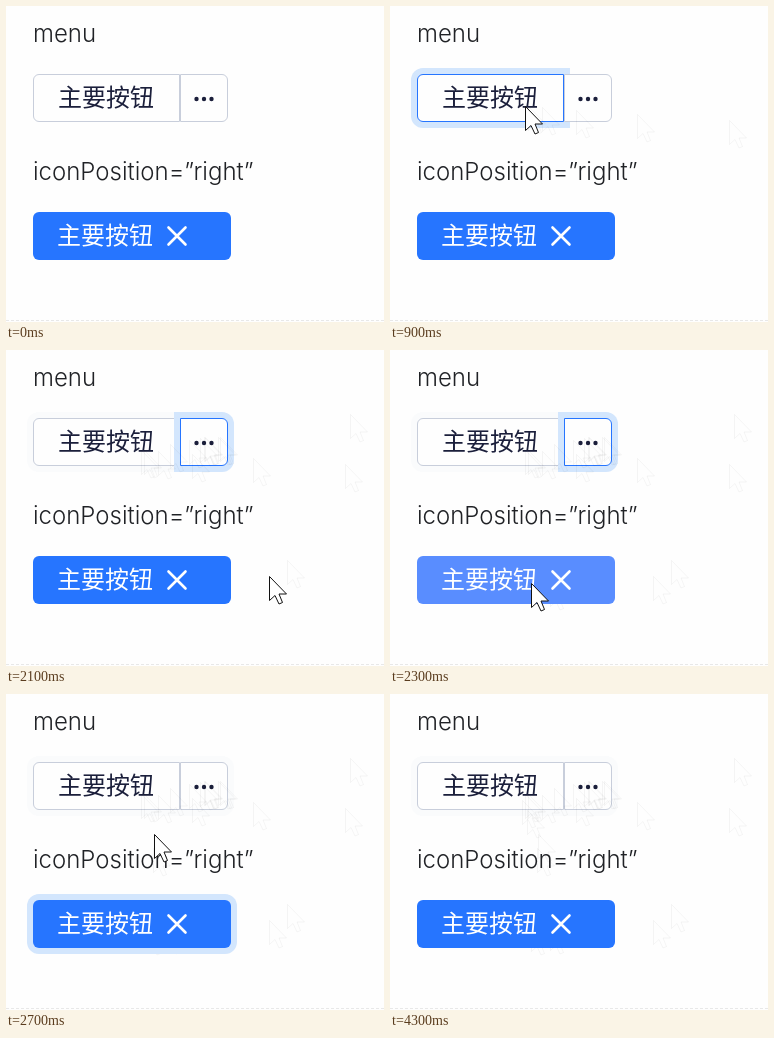
These frames come from a looping animation (378x316 px, 5500 ms). An HTML page:

```html
<!DOCTYPE html>
<html lang="zh">
<head>
<meta charset="utf-8">
<title>Button states</title>
<style>
  html, body { margin: 0; width: 100%; height: 100%; overflow: hidden; background: #fefefe; }
  svg { display: block; width: 378px; height: 316px; }
  .label { font: 300 24px Inter, "Open Sans", sans-serif; fill: #202226; }
  .cjk { font: 300 24px "Noto Sans CJK SC", "Noto Sans CJK", sans-serif; }
  .strong { font-weight: 500; }
</style>
</head>
<body>
<svg id="stage" viewBox="0 0 378 316"></svg>
<script>
const LOOP = 5500, STEP = 100, ENTER = 200, LEAVE = 3500, LAST_TRACE = 3000;
const BLUE = '#2675ff', INK = '#1b1f3b', GREY = '#c8cedb', HALO = '#d3e6fd', FADED = '#fafbfc';
const stage = document.getElementById('stage');

const main = { x: 27, y: 68, w: 147, h: 48, left: 6, right: 0 };
const more = { x: 174, y: 68, w: 48, h: 48, left: 0, right: 6 };
const solid = { x: 27, y: 206, w: 198, h: 48, left: 6, right: 6 };

// The pointer enters here and then makes a few eased moves.
const entry = { x: 340, y: 114 };
const moves = [
  { from: 200, to: 700, x: 136, y: 100 },
  { from: 900, to: 1400, x: 200, y: 87 },
  { from: 1500, to: 1700, x: 215, y: 87 },
  { from: 1800, to: 1900, x: 345, y: 64 },
  { from: 1900, to: 2000, x: 282, y: 210 },
  { from: 2000, to: 2100, x: 264, y: 226 },
  { from: 2100, to: 2300, x: 142, y: 233 },
  { from: 2500, to: 2700, x: 149, y: 140 },
  { from: 2700, to: 3000, x: 132, y: 104 },
  { from: 3000, to: 3400, x: 360, y: 49 }
];

const between = (t, from, to) => t >= from && t < to;
const easeOut = k => 1 - (1 - k) ** 2.7;
const inside = (p, b) => p && between(p.x, b.x, b.x + b.w) && between(p.y, b.y, b.y + b.h);

function pointerAt(t) {
  return moves.reduce((p, m) => {
    const k = easeOut(Math.min(1, Math.max(0, (t - m.from) / (m.to - m.from))));
    return { x: p.x + (m.x - p.x) * k, y: p.y + (m.y - p.y) * k };
  }, entry);
}

// Rounded box grown by d, with separate radii for its left and right corners.
function box(b, d, fill, stroke = 'none') {
  const l = b.left && b.left + d, r = b.right && b.right + d;
  const w = b.w + 2 * d, h = b.h + 2 * d;
  const path = `M${b.x - d + l} ${b.y - d}h${w - l - r}a${r} ${r} 0 0 1 ${r} ${r}v${h - 2 * r}` +
    `a${r} ${r} 0 0 1 ${-r} ${r}h${l + r - w}a${l} ${l} 0 0 1 ${-l} ${-l}v${2 * l - h}a${l} ${l} 0 0 1 ${l} ${-l}z`;
  return `<path d="${path}" fill="${fill}" stroke="${stroke}"/>`;
}

const text = (x, y, kind, words, fill) =>
  `<text x="${x}" y="${y}" class="${kind}"${fill ? ` fill="${fill}"` : ''}>${words}</text>`;

const arrow = (p, paint) =>
  `<path transform="translate(${Math.round(p.x) - .5} ${Math.round(p.y) + .5})" d="M0 0V24L5.5 19L9.5 27.5L13 26L9.5 17.5H17Z" ${paint}/>`;

const outlined = (b, content, focused, hovered) =>
  (focused ? box(b, 6, HALO) : '') +
  box(b, -.5, '#fefefe', focused || hovered ? BLUE : GREY) + content;

// Faint marks at the places the pointer has passed.
function traces(t) {
  let marks = '';
  for (let s = ENTER; s < Math.min(t, LAST_TRACE); s += STEP) {
    const p = pointerAt(s), next = pointerAt(s + STEP);
    if (p.x !== next.x) marks += arrow(p, 'fill="none" stroke="#000" stroke-opacity=".04"');
  }
  return marks;
}

function draw(t) {
  const pointer = between(t, ENTER, LEAVE) ? pointerAt(t) : null;
  const mainFocus = between(t, 600, 1300);
  const moreFocus = between(t, 1300, 2500);
  const solidFocus = between(t, 2500, 4300);
  const pressed = between(t, 2500, 2600);

  const dots = [-7.5, 0, 7.5].map(dx => `<circle cx="${198 + dx}" cy="93" r="2.2" fill="${INK}"/>`).join('');
  const solidFill = pressed ? '#0f3eae' : inside(pointer, solid) ? '#598dff' : BLUE;

  stage.innerHTML =
    text(27, 36, 'label', 'menu') +
    text(27, 174, 'label', 'iconPosition=”right”') +
    '<path d="M0 314.5H378" stroke="#e8e8e8" stroke-dasharray="3 2"/>' +
    (t >= 1300 ? box(main, 6, FADED) : '') +
    (t >= 2500 ? box(more, 6, FADED) : '') +
    outlined(main, text(52, 100, 'cjk', '主要按钮', INK), mainFocus, inside(pointer, main)) +
    outlined(more, dots, moreFocus, inside(pointer, more)) +
    traces(t) +
    (solidFocus ? box(solid, 6, HALO) : '') +
    box(solid, 0, solidFill) +
    text(51, 238, 'cjk strong', '主要按钮', '#fff') +
    '<path d="M162.5 221.5l17 17m0-17l-17 17" stroke="#fff" stroke-width="2.6" stroke-linecap="round"/>' +
    (pointer ? arrow(pointer, 'fill="#fff" stroke="#111"') : '');
}

const start = performance.now();
let shown = -1;
function tick() {
  const elapsed = (performance.now() - start) % LOOP;
  const t = Math.floor(elapsed / STEP) * STEP;
  if (t !== shown) draw(shown = t);
  requestAnimationFrame(tick);
}
tick();
</script>
</body>
</html>
```
